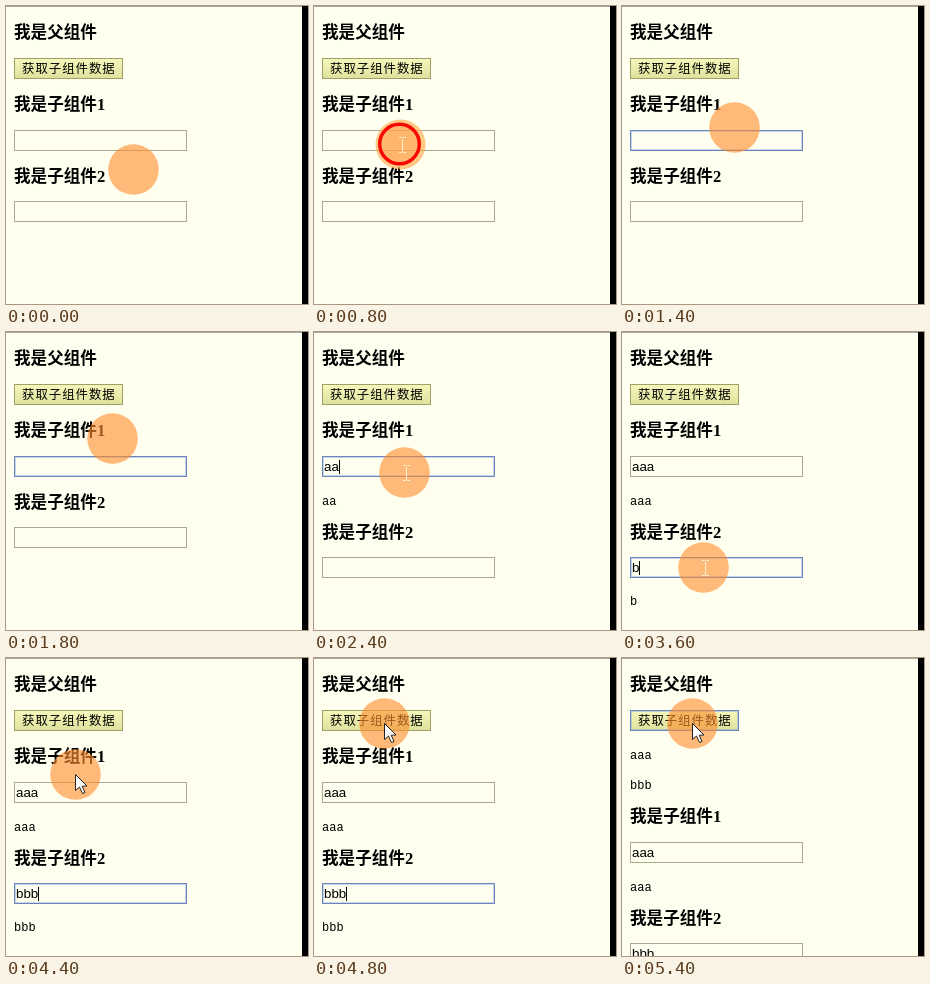
An HTML page with a canvas that plays this animation: 302x298 px, repeating every 5.6 s.

```html
<!DOCTYPE html>
<html lang="zh-CN">
<head>
<meta charset="utf-8">
<title>父子组件</title>
<style>
html, body { margin: 0; width: 100%; height: 100%; overflow: hidden; background: #fffff0; }
canvas { display: block; }
</style>
</head>
<body>
<canvas id="stage" width="302" height="298"></canvas>
<script>
const ctx = document.getElementById('stage').getContext('2d');
const LOOP = 5600, STEP = 200;
const PAPER = '#fffff0', INK = '#000';
const CJK = '"Noto Sans CJK SC", "Noto Sans CJK", "Noto Sans CJK JP", sans-serif';
const HEAD = 'bold 16.6px "Liberation Serif", ' + CJK;
const LABEL = '12.4px ' + CJK;
const FIELD = '13.33px "Liberation Sans", Arial, sans-serif';
const NOTE = '12px "Liberation Mono", monospace';

// pointer stops: time, x, y
const path = [
  [0, 127, 163], [600, 86, 138], [1000, 86, 138],
  [1400, 112, 121], [1800, 106, 106], [2200, 90, 140], [2600, 90, 140],
  [3000, 81, 235], [4000, 81, 235], [4400, 69, 116], [4800, 70, 65], [5600, 70, 65]
];
const clicks = [800, 3000, 5000];
const first = [2200, 2400, 2600];
const second = [3600, 3800, 4000];

function pointer(t) {
  let i = 0;
  while (i < path.length - 2 && path[i + 1][0] <= t) i++;
  const [t0, x0, y0] = path[i], [t1, x1, y1] = path[i + 1];
  const u = (t - t0) / (t1 - t0);
  return [Math.round(x0 + (x1 - x0) * u), Math.round(y0 + (y1 - y0) * u)];
}

const typed = (char, times, t) => char.repeat(times.filter(s => s <= t).length);

function rect(x, y, w, h, color) {
  ctx.fillStyle = color;
  ctx.fillRect(x, y, w, h);
}

function text(str, x, y, font, spacing = 0) {
  ctx.font = font;
  ctx.letterSpacing = spacing + 'px';
  ctx.fillStyle = INK;
  ctx.fillText(str, x, y);
}

function frame(x, y, w, h, color) {
  ctx.strokeStyle = color;
  ctx.lineWidth = 1;
  ctx.strokeRect(x + .5, y + .5, w - 1, h - 1);
}

function focusRing(x, y, w, h) {
  frame(x, y, w, h, '#6d84bd');
  frame(x + 1, y + 1, w - 2, h - 2, 'rgba(130,165,225,.45)');
}

function button(focused) {
  const g = ctx.createLinearGradient(0, 52, 0, 73);
  g.addColorStop(0, '#f7f8bc');
  g.addColorStop(1, '#dde09c');
  rect(8, 52, 109, 21, g);
  if (focused) focusRing(8, 52, 109, 21);
  else frame(8, 52, 109, 21, '#a0a066');
  text('获取子组件数据', 16, 67, LABEL, 1);
}

function input(y, value, focused, caret) {
  rect(8, y, 173, 21, PAPER);
  if (focused) focusRing(8, y, 173, 21);
  else frame(8, y, 173, 21, '#aaaa90');
  text(value, 10, y + 15, FIELD);
  if (caret) rect(Math.round(10 + ctx.measureText(value).width), y + 4, 1, 14, INK);
}

function disc(x, y, r, color) {
  ctx.fillStyle = color;
  ctx.beginPath();
  ctx.arc(x + .5, y + .5, r, 0, 7);
  ctx.fill();
}

function beam(x, y) {
  const c = 'rgba(255,248,225,.85)';
  rect(x, y - 6, 1, 13, c);
  for (const v of [y - 8, y + 7]) {
    rect(x - 3, v, 3, 1, c);
    rect(x + 1, v, 3, 1, c);
  }
}

function arrow(x, y) {
  const p = [[0, 0], [0, 16], [4, 12.5], [7, 19], [9.5, 18], [6.7, 11.7], [11.5, 11.5]];
  ctx.beginPath();
  for (const [dx, dy] of p) ctx.lineTo(x + dx + .5, y + dy + .5);
  ctx.closePath();
  ctx.fillStyle = '#fff';
  ctx.fill();
  ctx.strokeStyle = '#222';
  ctx.lineWidth = 1;
  ctx.stroke();
}

function cursor(t) {
  const [x, y] = pointer(t);
  if (clicks.includes(t)) {
    disc(x, y, 25, 'rgba(255,165,60,.6)');
    disc(x, y, 19, 'rgba(255,150,70,.35)');
    ctx.beginPath();
    ctx.arc(x - .5, y, 19.8, 0, 7);
    ctx.strokeStyle = '#f80600';
    ctx.lineWidth = 3.4;
    ctx.stroke();
  } else {
    disc(x, y, 25.3, 'rgba(255,143,48,.62)');
  }
  if (t >= 4200) arrow(x, y);
  else if ((t >= 600 && t <= 1000) || (t >= 2200 && t <= 2600)
    || (t >= 3000 && t <= 4000)) beam(x + 2, y + 1);
}

function draw(t) {
  const a = typed('a', first, t), b = typed('b', second, t);
  const shown = t >= 5200;
  const focus = t < 1000 ? 0 : t < 3000 ? 1 : t < 5000 ? 2 : 3;

  rect(0, 0, 302, 298, PAPER);
  text('我是父组件', 8, 32, HEAD);
  button(focus === 3);
  let y = 104;
  if (shown) {
    text(a, 8, 101, NOTE);
    text(b, 8, 131, NOTE);
    y += 60;
  }
  text('我是子组件1', 8, y, HEAD);
  input(y + 20, a, focus === 1, focus === 1 && t >= 2000);
  if (a) {
    text(a, 8, y + 69, NOTE);
    y += 30;
  }
  y += 72;
  text('我是子组件2', 8, y, HEAD);
  input(y + 19, b, focus === 2, focus === 2 && t >= 3200);
  if (b) text(b, 8, y + 67, NOTE);

  cursor(t);
  rect(0, 0, 296, 1, '#aaaaa4');
  rect(296, 0, 6, 298, '#000');
}

const start = performance.now();
function tick() {
  const t = (performance.now() - start) % LOOP;
  draw(Math.floor(t / STEP) * STEP);
  requestAnimationFrame(tick);
}
tick();
</script>
</body>
</html>
```
